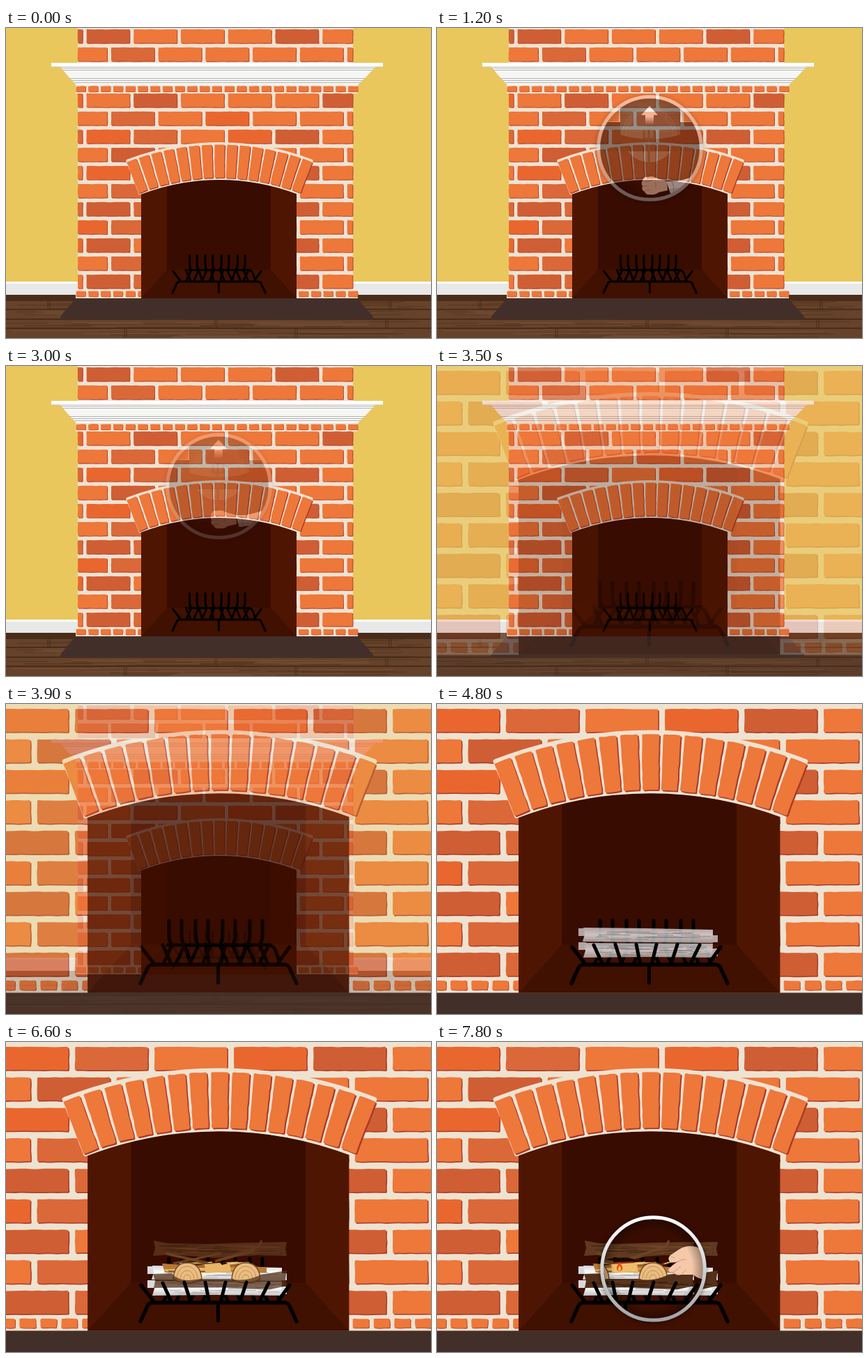
Write an HTML page that moves like this. It is 610 px wide and 445 px high and loops after 8000 ms.

```html
<!DOCTYPE html>
<html lang="en">
<head>
<meta charset="utf-8">
<title>Lighting a fireplace</title>
<style>
  html, body { margin: 0; width: 100%; height: 100%; overflow: hidden; }
  svg { display: block; width: 610px; height: 445px; }
  .lens { filter: drop-shadow(0 1px 3px rgba(0, 0, 0, .5)); }
</style>
</head>
<body>
<svg viewBox="0 0 610 445">
  <defs>
    <linearGradient id="rim" x2="0" y2="1"><stop stop-color="#fff"/><stop offset="1" stop-color="#a3a3a5"/></linearGradient>
    <linearGradient id="birch" x2="0" y2="1"><stop stop-color="#d4d4d6"/><stop offset=".45" stop-color="#fff"/><stop offset="1" stop-color="#c6c5c7"/></linearGradient>
    <linearGradient id="fade" x2="0" y2="1"><stop offset=".55" stop-color="#fff"/><stop offset="1" stop-color="#fff" stop-opacity="0"/></linearGradient>
    <radialGradient id="vignette"><stop offset=".75" stop-opacity="0"/><stop offset="1" stop-opacity=".4"/></radialGradient>
    <clipPath id="flueClip"><circle cx="305.5" cy="172.5" r="73"/></clipPath>
    <clipPath id="matchClip"><circle cx="310.5" cy="325.5" r="73"/></clipPath>
    <clipPath id="shaft"><path d="M263 90H349V153Q306 166 263 153Z"/></clipPath>
    <clipPath id="below"><path d="M220 177H390V250H220Z"/></clipPath>
    <g id="front" fill="none" stroke="#000" stroke-width="5" stroke-linecap="round" stroke-linejoin="round">
      <path d="M193 401L203 379Q205 374 211 374H399Q405 374 407 379L417 401M304.500 374V400"/>
      <path d="M194 349L211 371M225 346L236 370M256 345L264 370M286 345L291 370M315 345L309 370M345 345L337 370M377 346L365 370M407 349L391 371"/>
    </g>
  </defs>

  <g id="room">
    <path fill="#e9c75d" d="M0 0H610V445H0Z"/>
    <path fill="#e8e8e8" d="M0 364H610V383H0Z"/>
    <path fill="#fff" d="M0 364H610V367H0Z"/>
    <path fill="#66422a" d="M0 383H610V445H0Z"/>
    <path fill="#4a2c1a" d="M0 383H610V390H0Z"/>
    <g id="floor"></g>
    <path fill="#432f2a" d="M100 388H504L527 414V418H78V414Z"/>
    <path fill="#eee2d0" d="M103 0H498V388H103ZM100 82H505V94H100ZM100 376H505V388H100Z"/>
    <g id="bricks"></g>
    <path fill="#f6f6f4" d="M78 56H530L519 68L505 82H101L88 68Z"/>
    <path stroke="#b4b4b2" d="M79 57.500H529M81 60.500H526M91 72.500H516M95 75.500H512M98 78.500H509"/>
    <path fill="#fff" d="M65 50H541V55.500H65Z"/>
    <path fill="#d8d8d6" d="M65 55H541V56H65Z"/>
    <path fill="#4e1602" d="M194 388V238A313.600 313.600 0 0 1 417 238V388Z"/>
    <path fill="#401000" d="M194 388L231 347H380L417 388Z"/>
    <path fill="#380c00" d="M231 347V227A313.600 313.600 0 0 1 380 227V347Z"/>
    <g id="arch"></g>
    <g transform="translate(124.400 141.800) scale(.5942)">
      <path id="back" fill="none" stroke="#000" stroke-width="5" stroke-linecap="round" d="M232 346H376Q384 346 387 354L393 371"/>
      <use href="#front"/>
    </g>
  </g>

  <g id="near">
    <use href="#room" transform="translate(-209.400 -238.600) scale(1.683)"/>
    <g id="birches"></g>
    <g id="kindling"></g>
    <g id="topLogs"></g>
    <use href="#front"/>
  </g>

  <g id="flue" class="lens">
    <g clip-path="url(#flueClip)">
      <path fill="#380c00" d="M220 90H390V255H220Z"/>
      <path fill="#eee2d0" d="M220 90H390V136H220Z"/>
      <path fill="#ee773a" d="M220 111H261V134H220ZM352 111H390V134H352ZM220 90H261V106H220ZM352 90H390V106H352Z"/>
      <path fill="#260700" d="M220 135H390V177H220Z"/>
      <path fill="#37322f" d="M263 90H349V153Q306 166 263 153Z"/>
      <g clip-path="url(#shaft)" fill="none" stroke="#55504d">
        <circle cx="305" cy="154" r="39" fill="#403c3a"/><circle cx="305" cy="154" r="34"/>
        <path d="M263 122H349M281 122V135M329 122V135M270 148H340"/>
      </g>
      <circle cx="305" cy="154" r="38" fill="#4c423e" stroke="#5d5450" clip-path="url(#below)"/>
      <circle cx="305.500" cy="172.500" r="74" fill="url(#vignette)"/>
      <g id="push">
        <path fill="none" stroke="#211d1c" stroke-width="3" d="M304 157V209M297 144V156H312V144M304 143V157"/>
        <circle cx="304" cy="209" r="3.500" fill="#111"/>
        <path fill="#fff" d="M329 217L345 217L368 211L386 214V230L360 230L335 234Z"/>
        <path fill="#d5d8de" d="M335 234L333 228L370 224L386 226V231L360 230Z"/>
        <path fill="none" stroke="#a9aeb6" d="M337 217Q341 225 340 233"/>
        <path fill="#fbd0b3" d="M330 217L316 213Q310 209 303 211Q296 210 295 216Q292 220 295 224Q293 230 298 232Q300 237 306 236Q313 237 318 233L331 230Z"/>
        <path fill="none" stroke="#d99b79" d="M296 217H304Q308 217 310 214M295 224H304M298 231L306 229M312 218Q316 222 313 227"/>
        <path fill="url(#fade)" d="M305 109L317 122H311V136H299V122H293Z"/>
      </g>
    </g>
    <circle cx="305.500" cy="172.500" r="73.800" fill="none" stroke="url(#rim)" stroke-width="5"/>
  </g>

  <g id="match" class="lens">
    <g clip-path="url(#matchClip)">
      <use href="#near" x="-34"/>
      <path fill="#1b0703" d="M252 312Q268 307 284 312L282 319H255Z"/>
      <path fill="#8e2c12" d="M255 316L282 315V318L255 320Z"/>
      <path fill="#f0bd6c" d="M250 319L284 317L287 329L251 331Z"/>
      <path fill="#e8531c" d="M262 316Q268 323 266 327Q262 331 258 327Q257 322 262 316Z"/>
      <path fill="#ffd64a" d="M262 321Q265 325 263 328Q260 329 260 326Z"/>
      <path stroke="#d9a968" stroke-width="2" d="M324 319L345 313"/>
      <circle cx="324.500" cy="318.500" r="1.800" fill="#8d2c1b"/>
      <path fill="#f5c8aa" d="M390 302L372 294Q358 291 347 298L335 306Q330 311 334 315Q338 318 346 315Q336 321 332 327Q333 332 340 330Q342 336 350 334L368 334Q376 342 390 340Z"/>
      <path fill="none" stroke="#cf9675" d="M346 315Q352 312 357 312M340 330L350 322M351 333L358 327M336 308L341 310"/>
      <circle cx="310.500" cy="325.500" r="74" fill="url(#vignette)"/>
    </g>
    <circle cx="310.500" cy="325.500" r="73.800" fill="none" stroke="url(#rim)" stroke-width="5"/>
  </g>
</svg>

<script>
const $ = id => document.getElementById(id);
let seed = 7;
const rnd = () => (seed = seed * 16807 % 2147483647) / 2147483647;
const path = (d, fill, more = '') => `<path d="${d}" fill="${fill}" ${more}/>`;
const line = (d, color, width = 1) => path(d, 'none', `stroke="${color}" stroke-width="${width}"`);
const COLORS = { o: '#ee773a', b: '#e9672f', d: '#d05e34', m: '#db6838' };

// A quadrilateral with slightly rough edges and a dark lower right edge
function brick(corners, fill, shade = .9) {
  const pts = [];
  corners.forEach(([x, y], i) => {
    const [u, v] = corners[(i + 1) % 4];
    const len = Math.hypot(u - x, v - y), n = Math.max(2, Math.round(len / 5));
    for (let k = 0; k <= n; k++) {
      const f = Math.min(1 - .7 / len, Math.max(.7 / len, k / n));
      const j = () => (rnd() - .5) * .5;
      pts.push((x + (u - x) * f + j()).toFixed(1) + ' ' + (y + (v - y) * f + j()).toFixed(1));
    }
  });
  const d = 'M' + pts.join('L') + 'Z';
  return path(d, '#a83a28', `transform="translate(${shade} ${shade})"`) + path(d, fill);
}
const box = (x, y, r, b) => [[x, y], [r, y], [r, b], [x, b]];

function bricks() {
  const rows = ['ddooodo', 'omooooo', 'bodoood', 'omobooo', 'mbmobdo', 'odooooo', 'obooodo',
    'omooooo', 'mdmoodo', 'bmooooo', 'bdooodo', 'omooooo', 'odmoodo'];
  let out = '';
  rows.forEach((row, i) => {
    const y = i < 2 ? 2 + 26 * i : 42 + 26 * i;
    [...row].forEach((c, k) => {
      const x = (i % 2 ? 83.2 : 47.8) + 67.75 * k;
      out += brick(box(Math.max(103, x), y, Math.min(497.5, x + 62), y + 19.7), COLORS[c]);
    });
  });
  for (let k = 0; k < 23; k++) for (const y of [83.5, 377.7]) {
    const x = 100.6 + 17.75 * k;
    out += brick(box(x, y, x + 13.8, y + 8), COLORS.o, .5);
  }
  return out;
}

function arch() {
  const at = (r, deg, off = 0) => {
    const a = deg * Math.PI / 180;
    return [306.5 + r * Math.sin(a) + off * Math.cos(a), 531.5 - r * Math.cos(a) + off * Math.sin(a)];
  };
  const [a, b, c, d] = [at(365.5, -21.2), at(365.5, 21.2), at(315.6, 21.2), at(315.6, -21.2)];
  let out = path(`M${a}A365.5 365.5 0 0 1 ${b}L${c}A315.6 315.6 0 0 0 ${d}Z`, '#eee2d0',
    'stroke="#eee2d0" stroke-width="4" stroke-linejoin="round"');
  for (let i = -7; i <= 7; i++) {
    const g = i * 2.9;
    out += brick([at(364, g, -7.4), at(364, g, 7.4), at(316.3, g, 6.7), at(316.3, g, -6.7)], COLORS.o, 1.1);
  }
  return out;
}

function grain(x, y, w, h, n, color, width = 1) {
  let d = '';
  for (let i = 0; i < n; i++) {
    const len = w * (.08 + .2 * rnd());
    d += `M${(x + rnd() * (w - len)).toFixed(1)} ${(y + rnd() * h).toFixed(1)}q${len / 2} ${(rnd() * 2 - 1).toFixed(1)} ${len} 0`;
  }
  return line(d, color, width);
}

function floor() {
  let out = grain(0, 392, 610, 52, 60, '#57361f') + grain(0, 392, 610, 52, 30, '#755036');
  [391, 404, 418, 431].forEach((y, i) => {
    out += line(`M0 ${y}H610`, '#3f2616', 1.5);
    for (let x = 60 + i * 120 % 250; x < 610; x += 245) out += line(`M${x} ${y}v13m3 0v-13`, '#482c19');
  });
  return out;
}

const birches = () =>
  path('M203 322H212V333H203ZM203 342H214V353H203ZM394 332H403V342H394ZM394 351H403V362H394Z', '#d9d9db') +
  path('M212 343L396 344L395 364L300 363L210 364L213 354Z', 'url(#birch)') +
  path('M210 321L300 322L396 324V343L300 342L209 341L212 331Z', 'url(#birch)') +
  grain(212, 324, 182, 16, 26, '#b4b4b8') + grain(214, 346, 180, 16, 26, '#b4b4b8');

function kindling() {
  let out = path('M224 318L270 321L320 318L374 324V331H228Z', '#b77a35');
  for (let i = 0; i < 18; i++) {
    const x = 226 + rnd() * 85, y = 318 + rnd() * 11;
    out += line(`M${x} ${y}l${35 + rnd() * 25} ${rnd() * 10 - 5}`, ['#e2a64f', '#f2c983', '#8a5424'][i % 3], 1.6);
  }
  out += line('M230 304L292 319M240 318L310 303M300 315L356 300', '#6b4323', 3);
  out += path('M285 319L321 317L323 330L286 332Z', '#e8b567') + path('M307 317Q312 313 318 318L310 320Z', '#241008');
  for (const x of [260, 344]) {
    out += `<g stroke="#c58b4c">` + path(`M${x - 20} 340Q${x - 18} 317 ${x} 317Q${x + 19} 317 ${x + 21} 340Q${x} 352 ${x - 20} 340Z`, '#e9bd82', 'stroke="#7b4b26" stroke-width="1.5"');
    for (const r of [15, 10, 5]) out += path(`M${x - r} 340A${r} ${r * 1.2} 0 0 1 ${x + r} 340`, 'none');
    out += '</g>';
  }
  return out;
}

const topLogs = () =>
  path('M212 285L232 289L290 290L350 288L403 287L401 297L403 307L360 306L300 310L240 305L211 307L214 296Z', '#603a20') +
  grain(216, 291, 182, 13, 30, '#4a2a15') + grain(216, 291, 182, 13, 12, '#76492a') +
  line('M230 303L290 317M301 314L362 294L367 285', '#6f4524', 3) +
  path('M211 333L238 332Q246 342 262 342L280 340L322 340Q344 345 366 334L403 328L401 340L403 350L380 355L300 352L212 353L214 343Z', '#54311a') +
  grain(216, 344, 182, 7, 24, '#3f2210') + grain(216, 344, 182, 7, 10, '#6f4526');

function backProngs() {
  const tops = [234, 252, 272, 290, 311, 329, 350, 368];
  return tops.map((x, i) => {
    const side = i < 4 ? 1 : -1;
    return `M${x} 311V332Q${x} 340 ${x + 4 * side} 346L${x - 7 * side} 371`;
  }).join('');
}

for (const [id, make] of Object.entries({ floor, bricks, arch, birches, kindling, topLogs })) $(id).innerHTML = make();
$('back').setAttribute('d', $('back').getAttribute('d') + backProngs());

function frame(now) {
  const t = now % 8000;
  const step = start => Math.max(0, Math.min(4, Math.floor((t - start) / 200) + 1)) / 4;
  const show = (id, a) => {
    $(id).setAttribute('opacity', a);
    $(id).style.display = a ? '' : 'none';
  };
  show('flue', step(1000) - step(2600));
  $('push').setAttribute('transform', `translate(0 ${(.5 - step(1800)) * 6})`);
  show('near', step(3500));
  show('birches', step(4400));
  show('kindling', step(5300));
  show('topLogs', step(6200));
  show('match', step(7200));
  requestAnimationFrame(frame);
}
frame(performance.now());
</script>
</body>
</html>
```
